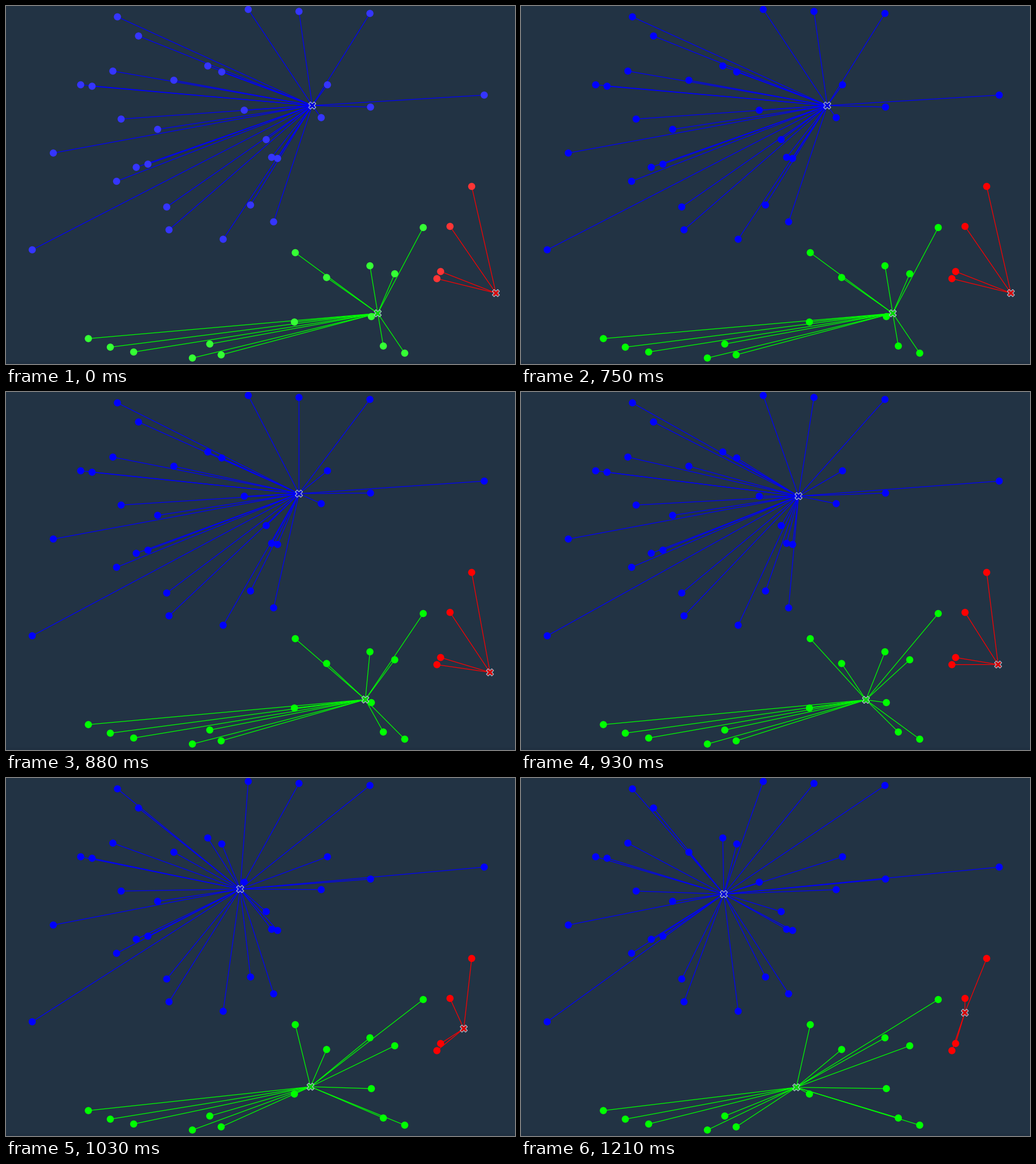
A matplotlib script that plays this animation: 893 by 627 pixels, repeating every 1510 ms.

```python
import colorsys

import numpy as np
import matplotlib.pyplot as plt
from matplotlib.animation import FuncAnimation
from matplotlib.collections import LineCollection, PatchCollection
from matplotlib.patches import Circle, Polygon, Rectangle

W, H, DPI = 893, 627, 64
PX = 72 / DPI                  # one pixel in points
LOOP, TICK = 1510, 10          # ms
EASE_TIME = 420
FADE_END, MOVE_START = 175, 773.5
SCALE = 1.25                   # stage zoom

# The scattered samples; their cluster and its goal are computed below.
DOTS = np.array([
    (195.5, 19), (232.5, 52.5), (425, 6), (514, 9.5), (638.5, 13),
    (187.5, 114), (131, 138), (151, 140.5), (294.5, 130), (354, 105),
    (378.5, 115.5), (564, 138), (839, 156), (639.5, 177), (553, 195.5),
    (418, 182.5), (202, 198), (266, 216), (83, 257.5), (228.5, 282.5),
    (249, 277), (194, 307), (456.5, 234), (466, 265), (476.5, 267),
    (282, 352), (286, 392), (381, 408.5), (429, 348.5), (469.5, 378),
    (46, 427), (507.5, 432), (562.5, 475.5), (638.5, 455), (682, 469),
    (732, 388), (506, 553.5), (641, 544), (662, 595.5), (699.5, 608),
    (144.5, 582.5), (183, 597.5), (224, 606), (327, 616.5), (357.5, 592),
    (377.5, 611), (817, 316), (779, 386), (762.5, 465), (756, 477.5)])
CENTERS = np.array([(859.5, 502.8), (652.2, 538.2), (537.3, 174.3)])


def quad_in_out(u):
    u = min(max(u, 0), 1)
    return 2 * u * u if u < 0.5 else 1 - 2 * (1 - u) ** 2


def fade_clock(t):
    return 40 + 50 * max(0, (t - 40) // 50)


def move_clock(t):
    """Picture changes come 50 ms apart, with one short 30 ms gap in five."""
    turns, rest = divmod(t - 750, 230)
    return 750 + 230 * turns + max(s for s in (0, 50, 80, 130, 180) if s <= rest)


def cross(r):
    """Plus sign with arm width 2r, turned by 45 degrees."""
    arm = r * np.array([1 + 1j, 1 + 3j, -1 + 3j])
    z = np.concatenate([arm * 1j ** k for k in range(4)])
    z = z * np.exp(0.25j * np.pi)
    return np.column_stack([z.real, z.imag])


CROSS = cross(np.sqrt(64 / 20) * SCALE)


class Cluster:
    def __init__(self, ax, rgb, dots, start):
        self.rgb = np.array(rgb)
        self.dots = dots
        self.start, self.goal = start, dots.mean(axis=0)
        self.lines = ax.add_collection(LineCollection(
            [], colors=[rgb], linewidths=SCALE * PX, zorder=1))
        self.discs = ax.add_collection(PatchCollection(
            [Circle(p, 5 * SCALE) for p in dots], linewidths=0, zorder=2))
        self.mark = ax.add_patch(Polygon(
            CROSS, fc=0.84 * self.rgb, ec="#aabbcc", lw=SCALE * PX,
            joinstyle="miter", zorder=3))

    def draw(self, move, pale):
        pos = self.start + (self.goal - self.start) * move
        self.lines.set_segments([(p, pos) for p in self.dots])
        self.discs.set_facecolor(self.rgb + (1 - self.rgb) * pale)
        self.mark.set_xy(CROSS + pos)
        return self.lines, self.discs, self.mark


fig = plt.figure(figsize=(W / DPI, H / DPI), dpi=DPI, facecolor="#223344")
ax = fig.add_axes([0, 0, 1, 1])
ax.set(xlim=(0, W), ylim=(H, 0))
ax.axis("off")
ax.add_patch(Rectangle((0, H - 4), W, 4, color="#203041", lw=0, zorder=0))

# k-means: every dot joins its nearest centre, which then moves to their mean
nearest = np.linalg.norm(DOTS[:, None] - CENTERS, axis=2).argmin(axis=1)
clusters = [Cluster(ax, colorsys.hsv_to_rgb(k / 3, 1, 1), DOTS[nearest == k], c)
            for k, c in enumerate(CENTERS)]


def update(i):
    t = i * TICK
    move = quad_in_out((move_clock(t) - MOVE_START) / EASE_TIME)
    pale = quad_in_out((FADE_END - fade_clock(t)) / EASE_TIME)
    return [a for c in clusters for a in c.draw(move, pale)]


anim = FuncAnimation(fig, update, frames=LOOP // TICK, interval=TICK,
                     repeat=True, repeat_delay=0, blit=False)
plt.show()
```
